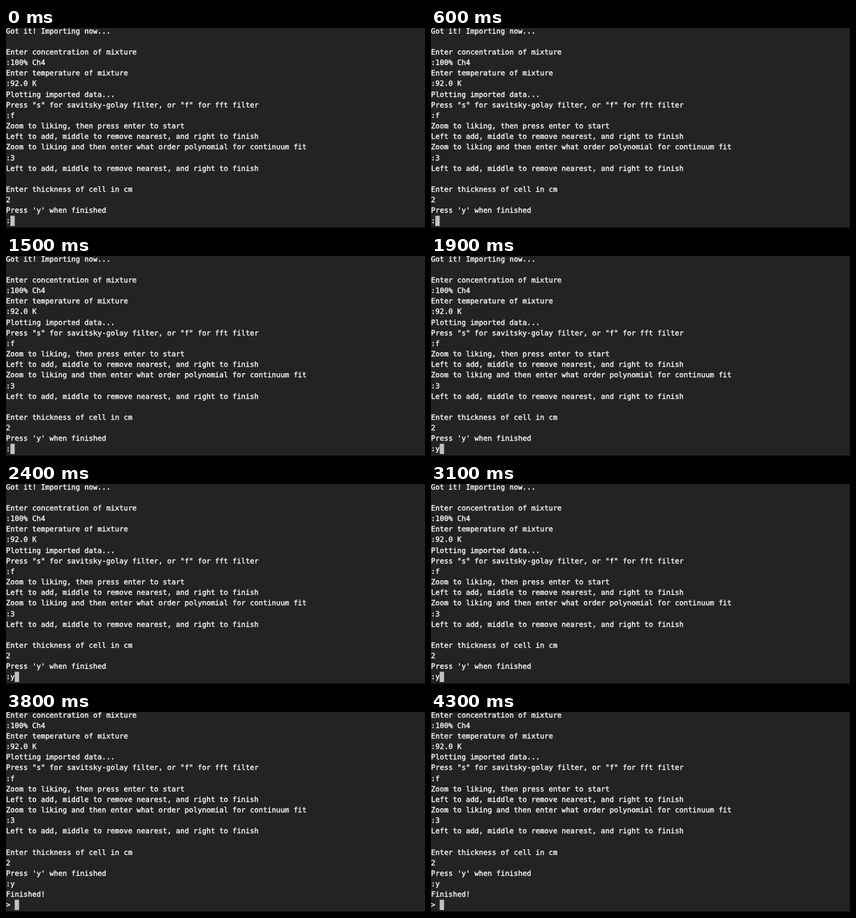
Recreate the animation shown at these times as an HTML page with a canvas. Size 600 px wide and 287 px high, loop 5100 ms.

```html
<!DOCTYPE html>
<html lang="en">
<head>
<meta charset="utf-8">
<title>Terminal session</title>
<style>
  html, body { margin: 0; width: 100%; height: 100%; overflow: hidden; background: #242224; }
  canvas { display: block; }
</style>
</head>
<body>
<canvas id="stage" width="600" height="287"></canvas>
<script>
const ctx = document.getElementById('stage').getContext('2d');
const W = 600, H = 287, LOOP = 5100;
const BG = '#242224', INK = '#fafafa', CURSOR = '#c2c2c2';
const SIZE = 10.36, ADVANCE = 6.237, ROW = 15.15, BASE = 7.7, WEIGHT = 0.35;
const TYPED = 1700, SCROLLED = 3200, PROMPT = 3300;

const log = [
  'Got it! Importing now...',
  '',
  'Enter concentration of mixture',
  ':100% Ch4',
  'Enter temperature of mixture',
  ':92.0 K',
  'Plotting imported data...',
  'Press "s" for savitsky-golay filter, or "f" for fft filter',
  ':f',
  'Zoom to liking, then press enter to start',
  'Left to add, middle to remove nearest, and right to finish',
  'Zoom to liking and then enter what order polynomial for continuum fit',
  ':3',
  'Left to add, middle to remove nearest, and right to finish',
  '',
  'Enter thickness of cell in cm',
  '2',
  "Press 'y' when finished"
];

// The invisible skew keeps baselines from snapping to whole pixels.
function drawLine(text, row) {
  ctx.setTransform(1, 0.00004, 0, 1, 0, BASE + row * ROW);
  ctx.fillStyle = ctx.strokeStyle = INK;
  ctx.fillText(text, 0, 0);
  ctx.strokeText(text, 0, 0);
  ctx.resetTransform();
}

function drawScreen(lines) {
  ctx.fillStyle = BG;
  ctx.fillRect(0, 0, W, H);
  lines.forEach(drawLine);
  const last = lines.length - 1;
  ctx.fillStyle = CURSOR;
  ctx.fillRect(lines[last].length * ADVANCE, BASE + last * ROW - 11, ADVANCE, 14.8);
  ctx.fillStyle = '#0c0b0c';
  ctx.fillRect(0, H - 1, W, 1);
}

// The first redraw after the scroll leaves the old top rows behind.
function drawStaleTop() {
  ctx.fillStyle = BG;
  ctx.fillRect(0, 0, W, 19.5);
  drawLine(log[0], 0);
}

function render(t) {
  if (t < SCROLLED) {
    drawScreen([...log, t < TYPED ? ':' : ':y']);
  } else {
    const prompt = t < PROMPT ? '' : '> ';
    drawScreen([...log.slice(2), ':y', 'Finished!', prompt]);
    if (t < PROMPT) drawStaleTop();
  }
}

ctx.textRendering = 'geometricPrecision';
ctx.font = SIZE + 'px "DejaVu Sans Mono", monospace';
ctx.lineWidth = WEIGHT;
ctx.lineJoin = 'round';
const start = performance.now();

function tick() {
  render((performance.now() - start) % LOOP);
  requestAnimationFrame(tick);
}
tick();
</script>
</body>
</html>
```
